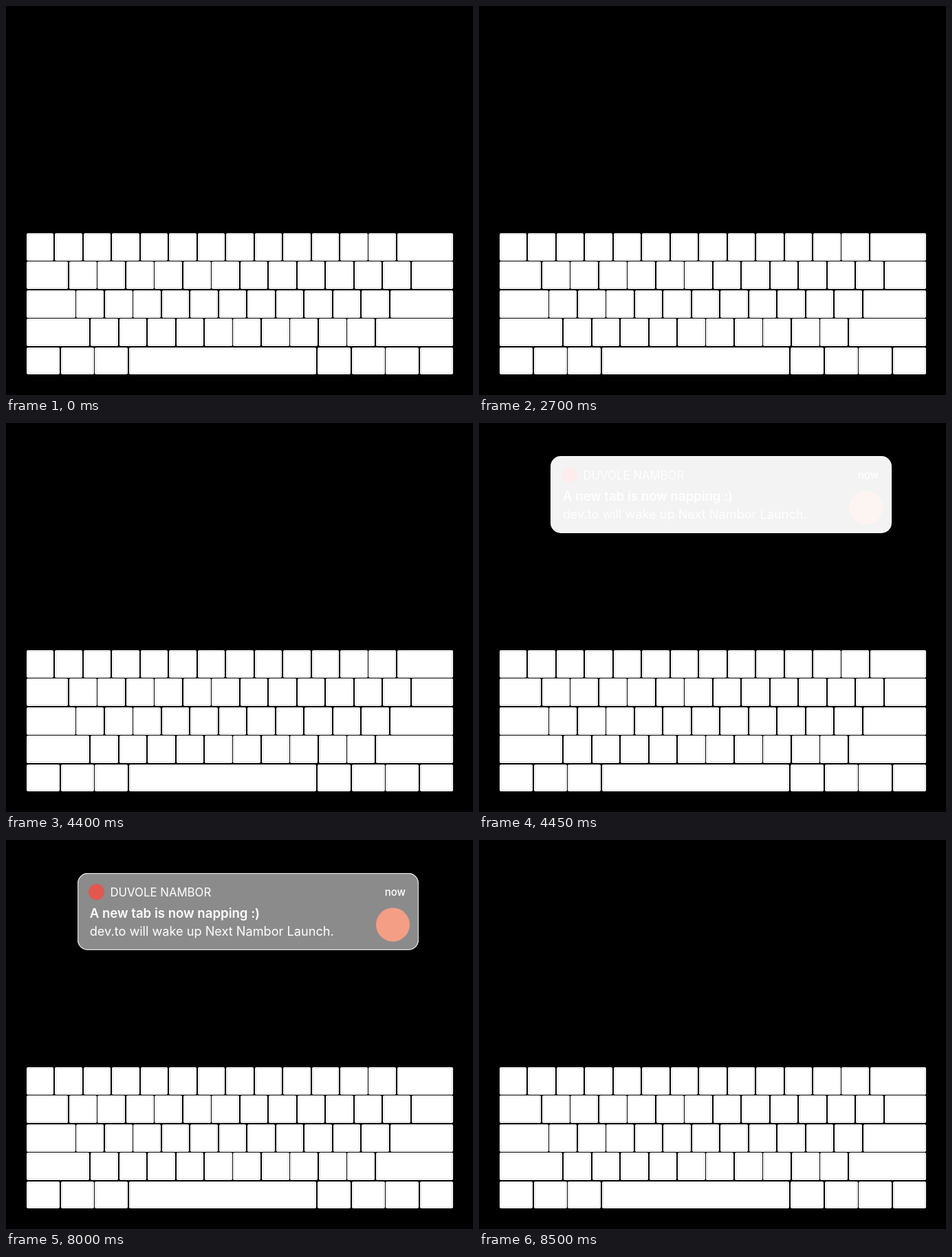
Recreate the animation shown at these times as an HTML page. Size 679x565 px, loop 8.55 s.

```html
<!DOCTYPE html>
<html lang="en">
<head>
<meta charset="utf-8">
<style>
  html, body { margin: 0; width: 100%; height: 100%; overflow: hidden; background: #000; }
  svg { display: block; width: 679px; height: 565px; }
  text { font-family: Inter, "Open Sans", sans-serif; fill: #fff; }
  .key { fill: #fff; }
  .face { fill: #fff; stroke: #d8dcd8; }
  .down .face { fill: #428bca; stroke: #a5c8e6; }
</style>
</head>
<body>
<svg viewBox="0 0 679 565">
  <g id="keys"></g>
  <g id="note" visibility="hidden">
    <rect x="104" y="48" width="496" height="112" rx="15" fill="#fff"/>
    <g id="content">
      <rect x="104.6" y="48.6" width="494.8" height="110.8" rx="14.4" fill="#808080" stroke="#dcdcdc" stroke-width="1.2"/>
      <circle cx="131.5" cy="75.5" r="11.5" fill="#e0483e"/>
      <text x="151.5" y="82" font-size="16.8">DUVOLE NAMBOR</text>
      <text x="581" y="81" font-size="15" font-weight="500" text-anchor="end">now</text>
      <text x="121.7" y="112.5" font-size="18.6" font-weight="600">A new tab is now napping :)</text>
      <text x="121.7" y="138.5" font-size="18.15">dev.to will wake up Next Nambor Launch.</text>
      <circle cx="562.5" cy="123" r="24.5" fill="#f3957a"/>
    </g>
  </g>
</svg>
<script>
const LOOP = 8550, UNIT = 41.47, GAP = 1.8, LEFT = 29.8, TOP = 329.9;
const $ = id => document.getElementById(id);
const ones = n => Array(n).fill(1);

// Key widths per row, in units
const rows = [
  [...ones(13), 2],
  [1.5, ...ones(12), 1.5],
  [1.75, ...ones(11), 2.25],
  [2.25, ...ones(10), 2.75],
  [1.2, 1.2, 1.2, 6.6, 1.2, 1.2, 1.2, 1.2]
];

function add(parent, name, attrs) {
  const el = document.createElementNS("http://www.w3.org/2000/svg", name);
  for (const k in attrs) el.setAttribute(k, attrs[k]);
  return parent.appendChild(el);
}

// Start and size of a span in units, snapped to whole pixels
function snap(origin, from, size) {
  const start = Math.round(origin + from * UNIT);
  return [start, Math.round(origin + (from + size) * UNIT - GAP) - start];
}

function addKey(u, row, size) {
  const [x, width] = snap(LEFT, u, size);
  const [y, height] = snap(TOP, row, 1);
  const key = add($("keys"), "g", {});
  add(key, "rect", { class: "key", x, y, width, height, rx: 2 });
  add(key, "rect", { class: "face", x: x + 1.5, y: y + 1.5, width: width - 3, height: height - 3, rx: 1 });
  return key;
}

const keys = rows.map((sizes, row) => {
  let u = 0;
  return sizes.map(size => {
    const key = addKey(u, row, size);
    u += size;
    return key;
  });
});

// Each press: key, start, end
const presses = [
  [keys[4][2], 2000, 2200],
  [keys[4][2], 3700, 3900],
  [keys[3][0], 3700, 3900],
  [keys[1][10], 3900, 4400]
];

const step = (t, start) => Math.floor((t - start) / 50);

function noteAlpha(t) {
  if (t < 4400) return 0;
  if (t < 8000) return Math.min(1, step(t, 4400) / 11);
  return Math.max(0, 1 - (step(t, 8000) + 1) / 11);
}

function draw(now) {
  const t = now % LOOP;
  for (const [key] of presses) key.classList.remove("down");
  for (const [key, start, end] of presses)
    if (t >= start && t < end) key.classList.add("down");

  // The note fades through white and is cut hard at zero
  const alpha = noteAlpha(t);
  $("note").setAttribute("visibility", alpha > 0 ? "visible" : "hidden");
  $("content").setAttribute("opacity", alpha);
  requestAnimationFrame(draw);
}
requestAnimationFrame(draw);
</script>
</body>
</html>
```
